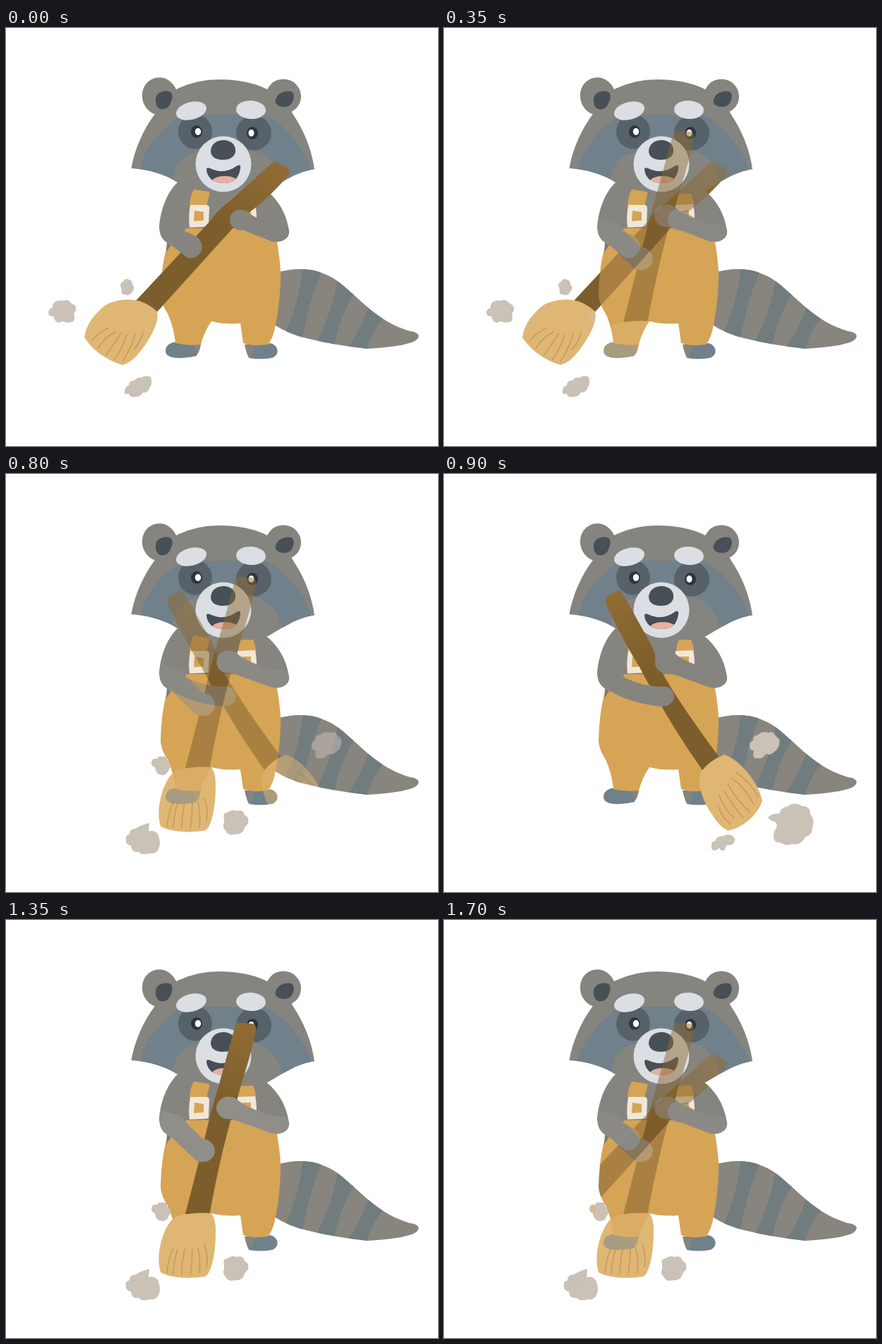
Animation, 612 px wide and 593 px high, one loop 1.8 s. Source, as an HTML page with a canvas:

```html
<!DOCTYPE html>
<html>
<head>
<meta charset="utf-8">
<title>Sweeping raccoon</title>
<style>
html, body { margin: 0; width: 100%; height: 100%; overflow: hidden; background: #fff; }
canvas { display: block; }
</style>
</head>
<body>
<canvas id="stage" width="612" height="593"></canvas>
<script>
const W = 612, H = 593;
const fur = '#86847f', blue = '#70818b', tan = '#d6a455', dark = '#484f57', pale = '#dbdfe3';
const ctx = document.getElementById('stage').getContext('2d');

function fill(c, color, path) {
  c.fillStyle = color;
  c.fill(new Path2D(path));
}

function oval(c, color, x, y, rx, ry, turn = 0) {
  c.beginPath();
  c.ellipse(x, y, rx, ry, turn, 0, 7);
  c.fillStyle = color;
  c.fill();
}

function stroke(c, color, width, path) {
  c.strokeStyle = color;
  c.lineWidth = width;
  c.lineCap = 'round';
  c.stroke(new Path2D(path));
}

// Fills inner shapes so that they stay inside an outer one.
function inside(c, outer, draw) {
  c.save();
  c.clip(new Path2D(outer));
  draw();
  c.restore();
}

function drawTail(c) {
  const tail = 'M380 348Q420 336 450 348.5C470 356 480 368 491 377C512 396 535 419 572 430C581 431 585 434 584.5 438C582 446 570 447 560 450Q535 454 512 455Q465 450 425 440Q400 434 380 421Z';
  fill(c, '#88857e', tail);
  inside(c, tail, () => fill(c, '#717c7f',
    'M421 338L448 344Q430 385 420 440L396 432Q415 390 421 338ZM470 355L494 376Q472 410 465 452L440 446Q463 400 470 355ZM513 396L534 412Q518 430 510 460L482 456Q502 430 513 396Z'));
}

function drawBody(c) {
  fill(c, fur, 'M262 447L276 449Q274 462 268 466L258 460ZM338 449L356 447L354 466L344 468Q340 460 338 449Z');
  fill(c, blue, 'M226 458C226 449 236 444 247 446L264 450Q269 457 270 465Q256 469 242 468Q226 467 226 458ZM353 449Q368 449 374 447C387 450 388 464 377 468Q360 471 344 468Q349 465 353 449Z');
  fill(c, fur, 'M243 219C225 236 218 265 217 283Q218 300 231 306L380 304C397 303 404 295 400 283C397 262 383 240 367 229Z');
  fill(c, tan, 'M256 284L355 284L384 304Q390 340 389 358Q387 398 382 420Q379 440 371 449Q350 452 336 447L332 419Q310 421 291 416Q281 430 276 449Q256 451 240 447Q238 425 229 405Q219 390 219 378Q220 336 229 306Z');
  fill(c, '#7c7a74', 'M228 304L234 308L227 318Z');
  fill(c, tan, 'M266 229L286 232Q289 233 288 237L284 253L260 251Q261 238 266 229ZM333 235L350 235Q354 244 354 252L329 252Q329 242 333 235Z');
  fill(c, '#f0e7da', 'M261 251L285 251Q288 252 288 256L287 280Q286 282 283 282L260 283Q258 268 261 251ZM328 251L353 250Q355 258 355 272L326 272Z');
  fill(c, tan, 'M267 259L280 261L280 273L266 274ZM335 259L347 259L347 269L334 267Z');
}

function drawHead(c) {
  oval(c, fur, 218, 97, 25, 27, -.3);
  oval(c, fur, 393, 97, 25, 24.5);
  const head = 'M177.5 199C182 172 195 143 211 122C220 104 231 92 243 86Q270 73 302 73Q339 73 366 85Q395 99 407 123C421 144 433 171 437 200.5C414 203 396 216 369 231Q308 244 245 220C225 207 203 201 177.5 199Z';
  fill(c, fur, head);
  fill(c, dark, 'M212 103C211 93 221 88 231 90C238 92 236 102 232 109C227 118 212 119 212 103ZM383 99C386 92 396 88 404 90C410 93 408 102 404 108C397 116 376 111 383 99Z');
  inside(c, head, () => {
    fill(c, blue, 'M190 200C194 178 210 155 231 137Q247 123 263 123L358 123Q373 123 387 136C408 154 426 178 433 202Q410 209 389 219L240 219Q212 205 190 200Z');
    fill(c, fur, 'M238 220C234 198 249 179 274 175L346 173C376 179 386 196 390 218L366 234L250 234Z');
  });
  const mask = '#566169';
  oval(c, mask, 268, 147, 24, 24.5);
  oval(c, mask, 351, 149, 25, 24.5);
  oval(c, '#2d363c', 270, 147, 8, 9);
  oval(c, '#2d363c', 349, 149, 8, 9);
  oval(c, '#fff', 272, 147, 4.2, 5);
  oval(c, '#fff', 347.5, 149, 4, 5);
  oval(c, pale, 262.5, 117.5, 22, 12.5, -.25);
  oval(c, pale, 347, 116, 21, 13, .05);
  oval(c, pale, 308, 193, 39.5, 39.5);
  fill(c, dark, 'M290 174C291 164 299 159 309 159C320 160 326 166 325 176C323 184 316 187 307 187C296 187 290 182 290 174Z');
  const mouth = 'M284 201Q284 197 289 199Q309 209 328 195Q333 193 332 199C330 214 322 220 309 220C293 220 285 212 284 201Z';
  fill(c, '#454d56', mouth);
  inside(c, mouth, () => oval(c, '#e8b09f', 310, 218, 18, 8));
}

const poses = [
  {
    stick: 'M375 193Q381 188 385 191L398 198Q404 203 401 208Q377 236 352 256Q337 266 324 281L212 405L182 389L289 274Q300 258 318 245Z',
    grain: [390, 198, 200, 395],
    broom: 'M183 386Q198 388 214 402C218 416 205 440 191 458Q178 475 165 478Q154 475 140 467Q122 456 111 439C114 419 126 405 141 393Q160 383 183 386Z',
    bristles: 'M121 444Q132 431 145 426M130 454Q141 438 155 431M142 464Q153 448 163 433M153 471Q165 455 171 435M165 473Q177 455 183 434M181 456Q192 444 194 432',
    arms: fur,
    arm: 'M220 270C215 290 219 300 232 306L253 323C264 332 278 322 278 310C277 298 265 292 254 289L247 278Z',
    hand: 'M399 280C404 298 393 305 377 303L337 287C324 288 317 281 317 271C318 259 331 254 343 261Q350 268 370 276Z',
    dust: 'M60 403Q61 398 66 397C65 388 74 385 80 387Q88 384 93 391Q100 393 99 401L96 405Q99 414 94 417Q85 419 80 416Q71 422 67 409Q60 409 60 403ZM162 366Q162 361 166 360Q169 354 174 357Q179 358 179 364Q184 369 179 374Q175 381 169 378Q162 379 164 371ZM168 514Q169 508 174 507Q174 500 182 500Q186 495 192 496Q197 492 205 495Q208 505 203 511Q201 518 194 517Q190 524 183 523Q176 525 174 519L168 519Z'
  },
  {
    stick: 'M324 152Q325 146 331 146L349 147Q355 149 354 155C348 190 336 222 328 252Q306 320 288 420L254 417Q278 325 291 270Q308 213 324 152Z',
    grain: [338, 150, 271, 417],
    broom: 'M246 419Q269 414 291 416Q297 424 297 440Q297 474 290 494Q286 505 281 506Q262 509 244 507Q228 505 219 500Q215 486 217 470Q221 444 232 429Q237 422 246 419Z',
    bristles: 'M228 501Q230 480 237 465M237 502Q238 482 243 468M249 503Q249 485 253 467M261 503Q264 485 264 466M274 501Q276 483 272 466M284 492Q287 478 281 460',
    arms: '#908e89',
    arm: 'M220 270C215 290 219 300 232 306L268 340C280 348 296 341 296 327C295 316 286 311 278 310L256 288L247 278Z',
    hand: 'M399 280C404 298 393 305 377 303L319 282C306 284 298 276 298 266C299 252 315 246 327 254Q333 262 370 276Z',
    dust: 'M206 409Q207 403 214 404Q216 399 222 401Q229 400 228 406Q234 408 233 416Q231 419 230 421Q227 428 220 427Q212 426 211 416Q206 415 206 409ZM170 520Q168 513 175 511Q175 503 184 503Q191 498 203 495L202 507Q212 504 216 513Q220 525 216 532Q212 540 204 538Q193 542 188 536Q178 538 177 527Q170 526 170 520ZM309 489Q306 481 314 480Q320 475 327 478Q336 475 338 484Q345 486 343 496Q338 500 337 505Q333 512 324 511Q315 514 311 506Q306 501 309 495Z'
  },
  {
    stick: 'M229 184Q228 178 232 173L245 166Q250 164 253 169L296 247Q299 254 300 263Q315 300 390 402L366 420Q327 365 295 306Q287 294 277 274Q254 237 229 184Z',
    grain: [240, 173, 378, 410],
    broom: 'M363 424Q376 406 397 398Q412 403 427 420Q445 440 451 463Q446 479 432 491Q418 503 402 506Q390 500 381 485Q365 463 362 440Q361 430 363 424Z',
    bristles: 'M388 470Q394 488 406 497M390 456Q397 477 411 487M397 450Q409 470 424 488M402 440Q415 463 434 480M408 432Q426 444 439 469M413 423Q435 438 445 458',
    arms: fur,
    arm: 'M220 270C215 290 219 300 232 306Q260 324 306 330C317 331 326 325 326 315C325 304 315 299 305 302Q278 300 256 289L247 278Z',
    hand: 'M399 280C404 298 393 305 377 303L319 282C306 284 298 276 299 266C300 252 315 246 327 254Q333 262 370 276Z',
    dust: 'M433 386Q432 380 438 378Q437 371 445 370Q451 364 459 367Q467 364 470 372Q477 375 475 384Q473 391 468 394Q462 400 456 397Q452 405 444 403Q436 405 439 392Q433 393 433 386ZM459 487Q465 481 475 482Q477 473 486 472Q496 464 507 471Q519 471 519 483Q526 490 522 502Q521 513 512 515Q506 527 494 525Q483 528 477 523Q467 524 467 514Q466 508 471 502Q473 496 468 493Q462 492 459 487ZM379 526Q379 521 384 521Q386 513 395 514Q402 510 408 513Q414 517 411 523Q407 528 402 526Q398 528 398 533Q393 537 390 530Q388 534 382 534Q378 533 379 526Z'
  }
];

function render(pose) {
  const layer = document.createElement('canvas');
  layer.width = W;
  layer.height = H;
  const c = layer.getContext('2d');
  drawTail(c);
  drawBody(c);
  drawHead(c);
  fill(c, '#cac1b7', pose.dust);
  const wood = c.createLinearGradient(...pose.grain);
  wood.addColorStop(0, '#906c33');
  wood.addColorStop(.45, '#7d5d2b');
  wood.addColorStop(1, '#7c5d2d');
  fill(c, wood, pose.stick);
  fill(c, '#dfb674', pose.broom);
  stroke(c, '#c79c59', 1.6, pose.bristles);
  fill(c, pose.arms, pose.arm);
  fill(c, pose.arms, pose.hand);
  return layer;
}

const layers = poses.map(render);
const order = [0, 1, 2, 1];
const HOLD = 350, BEAT = 450;

function show(ms) {
  const t = ms % (BEAT * order.length);
  const i = Math.floor(t / BEAT);
  ctx.clearRect(0, 0, W, H);
  ctx.drawImage(layers[order[i]], 0, 0);
  if (t % BEAT < HOLD) return;
  // The next pose shows half through, only where something is already painted.
  ctx.save();
  ctx.globalCompositeOperation = 'source-atop';
  ctx.globalAlpha = .5;
  ctx.drawImage(layers[order[(i + 1) % order.length]], 0, 0);
  ctx.restore();
}

const start = performance.now();
function tick() {
  show(performance.now() - start);
  requestAnimationFrame(tick);
}
tick();
</script>
</body>
</html>
```
